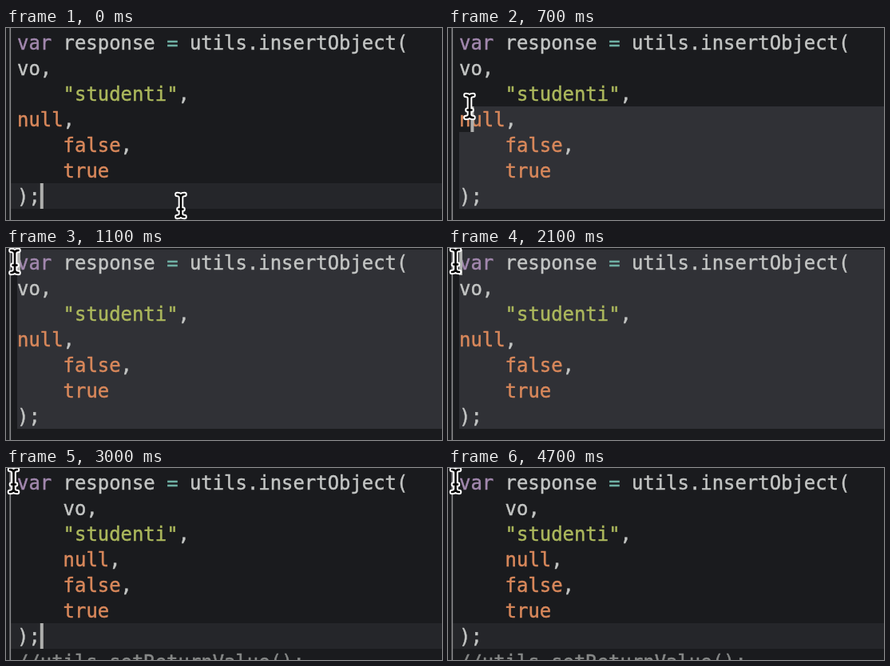
Animation of 546 by 240 pixels, one loop 4800 ms. Source, as an HTML page:

```html
<!DOCTYPE html>
<html lang="en">
<head>
<meta charset="utf-8">
<title>Code selection and re-indent</title>
<style>
  html, body { margin: 0; width: 100%; height: 100%; overflow: hidden; background: #1a1b1e; }
  svg { display: block; width: 546px; height: 240px; }
  text {
    font: 23.92px "DejaVu Sans Mono", "Noto Sans Mono", monospace; white-space: pre;
    color: #c3c5c4; fill: currentColor; stroke: currentColor; stroke-width: .45px;
  }
  tspan { fill: currentColor; stroke: currentColor; }
  .key { color: #a288ae; }
  .op { color: #6fb0a5; }
  .str { color: #acb85c; }
  .lit { color: #d9885b; }
  .note { color: #868887; }
  .beam { fill: none; stroke-linecap: round; stroke-linejoin: round; }
</style>
</head>
<body>
<svg viewBox="0 0 546 240">
  <rect width="546" height="240" fill="#1a1b1e"/>
  <rect id="active" x="6" width="540" height="32" fill="#25262a"/>
  <path id="selection" fill="#303136"/>
  <rect x="4.5" width="1.6" height="240" fill="#8c8c8e"/>
  <g id="code"></g>
  <rect id="caret" width="4" height="32" fill="#aeafad"/>
  <g id="pointer">
    <path class="beam" stroke="#fff" stroke-width="6.6"/>
    <path class="beam" stroke="#000" stroke-width="2.6"/>
  </g>
</svg>
<script>
const LOOP = 4800, STEP = 100;
const LEFT = 14, TOP = 2, ROW = 32, COL = 14.4, WIDTH = 546;
const PRESS = 400, SETTLE = 1100, REFORMAT = 2900;

const code = `var response = utils.insertObject(
vo,
    "studenti",
null,
    false,
    true
);
//utils.setReturnValue();`.split("\n");
const END = code.length - 1;

// Pointer key points: time, x, y.
const path = [
  [0, 219, 222], [500, 152, 238], [600, 145, 204.5],
  [700, 27, 98], [SETTLE, 11, 17], [1200, 9.5, 16]
];

const $ = id => document.getElementById(id);
const colX = col => LEFT + col * COL;
const rowY = row => TOP + row * ROW;
const clamp = (v, max) => Math.max(0, Math.min(max, v));

function set(id, attrs) {
  for (const name in attrs) $(id).setAttribute(name, attrs[name]);
}

const show = on => on ? "visible" : "hidden";

function highlight(line) {
  const rules = /(?<note>\/\/.*)|(?<str>"[^"]*")|(?<key>\bvar\b)|(?<lit>\b(?:null|true|false)\b)|(?<op>=)/g;
  return line.replace(rules, (token, ...rest) => {
    const groups = rest.pop();
    return `<tspan class="${Object.keys(groups).find(k => groups[k])}">${token}</tspan>`;
  });
}

const lines = code.map((line, row) => {
  const el = document.createElementNS("http://www.w3.org/2000/svg", "text");
  el.setAttribute("y", rowY(row) + 25);
  el.innerHTML = highlight(line.trim());
  $("code").append(el);
  const inner = row > 0 && row < END - 1;
  return { el, tight: line.search(/\S/), tidy: inner ? 4 : 0 };
});

// Each leg of the drag slows towards its end.
function pointerAt(t) {
  const i = path.findIndex(p => p[0] > t);
  if (i < 0) return path[path.length - 1].slice(1);
  const a = path[i - 1], b = path[i];
  const k = 1 - (1 - (t - a[0]) / (b[0] - a[0])) ** 2;
  return [1, 2].map(n => a[n] + (b[n] - a[n]) * k);
}

// While dragging, the caret follows the pointer; otherwise it ends the statement.
function caretAt(t, [x, y]) {
  if (t < PRESS || t >= REFORMAT) return [END - 1, code[END - 1].length];
  const row = clamp(Math.floor((y - TOP) / ROW), END);
  const length = row < END ? code[row].length : 0;
  return [row, clamp(Math.round((x - LEFT) / COL), length)];
}

function caretOn(t) {
  const since = t >= REFORMAT ? REFORMAT : t >= SETTLE ? SETTLE : t;
  return (t - since) % 1000 < 600;
}

function selectionPath(row, col) {
  const x = colX(col), y = rowY(row);
  return `M${x} ${y}H${WIDTH}V${rowY(END)}H${row < END - 1 ? LEFT : x}V${y + ROW}H${x}Z`;
}

function draw(ms) {
  const t = Math.floor(ms % LOOP / STEP) * STEP;
  const tidy = t >= REFORMAT;
  const pointer = pointerAt(t);
  const [row, col] = caretAt(t, pointer);
  const selecting = t >= PRESS && !tidy && row < END;

  lines.forEach((line, i) => {
    line.el.setAttribute("x", colX(tidy ? line.tidy : line.tight));
    line.el.setAttribute("visibility", show(i < END || tidy));
  });
  set("active", { y: rowY(row), visibility: show(!selecting) });
  set("selection", { d: selecting ? selectionPath(row, col) : "" });
  set("caret", { x: colX(col), y: rowY(row), visibility: show(caretOn(t)) });
  set("pointer", { transform: `translate(${pointer})` });
}

document.querySelectorAll(".beam").forEach(p => p.setAttribute("d",
  "M-4.5 -14Q0 -14 0 -10Q0 -14 4.5 -14M0 -10V10M-4.5 14Q0 14 0 10Q0 14 4.5 14M-2.5 4.5H2.5"));

const start = performance.now();
(function frame() {
  draw(performance.now() - start);
  requestAnimationFrame(frame);
})();
</script>
</body>
</html>
```
